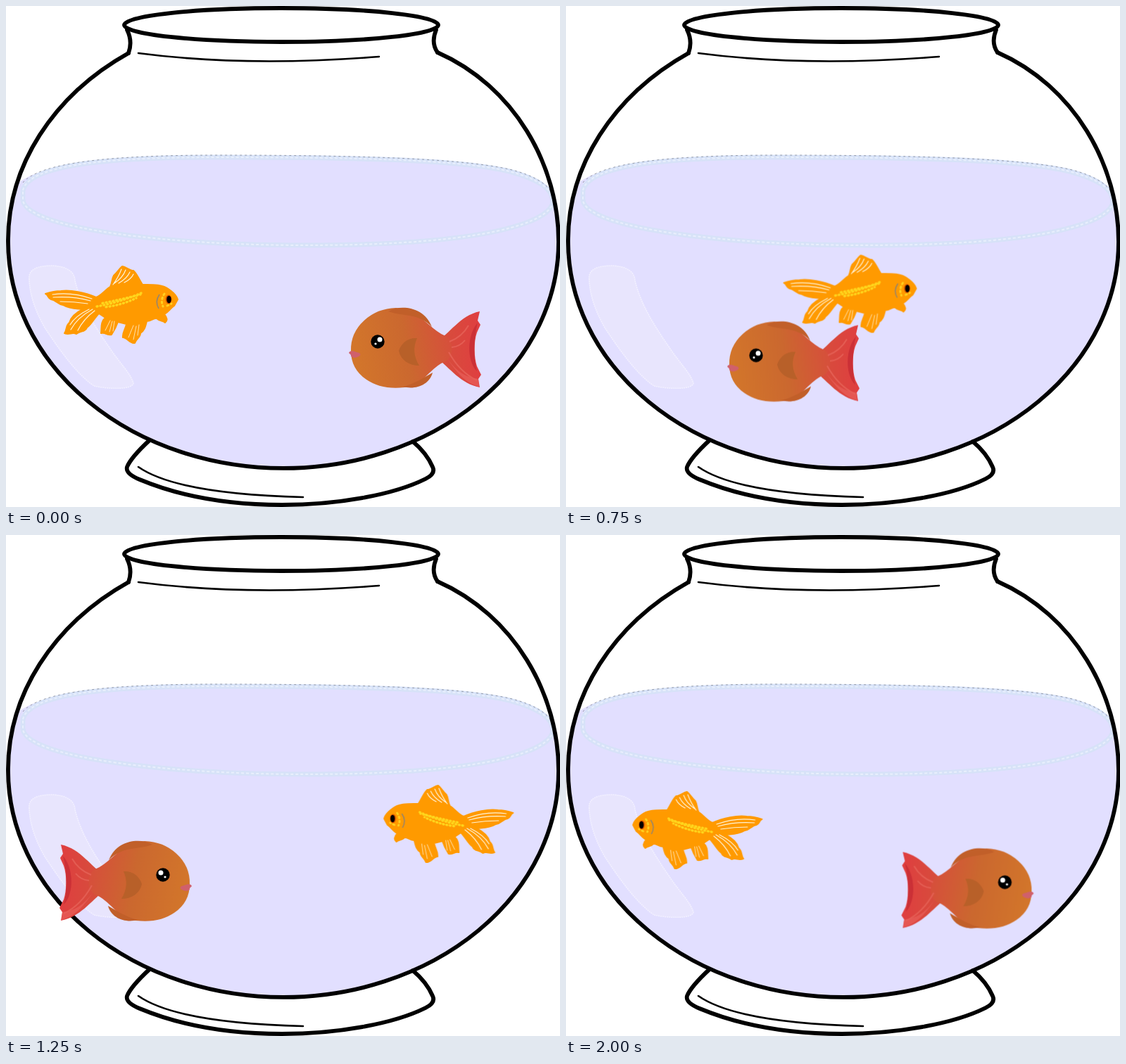
These frames come from a looping animation (787 by 712 pixels, 2250 ms). An HTML page:

```html
<!DOCTYPE html>
<html lang="en">
<head>
<meta charset="utf-8">
<title>Fish bowl</title>
<style>
  html, body { margin: 0; width: 100%; height: 100%; overflow: hidden; background: #fff; }
  svg { display: block; width: 787px; height: 712px; }
  .ink { fill: none; stroke: #000; stroke-width: 5.8; stroke-linecap: round; stroke-linejoin: round; }
  .thin { stroke-width: 2.6; }
  .rays { fill: none; stroke: #fff3da; stroke-width: 1.2; stroke-linecap: round; }
  .swim { animation: 2250ms step-end infinite; transform-origin: 0 0; }
  #gold { animation-name: gold; }
  #red { animation-name: red; }

  @keyframes gold {
    0% { transform: translate(0, 0); }
    11.111% { transform: translate(71px, -5px); }
    22.222% { transform: translate(141.5px, -10px); }
    33.333% { transform: translate(253.5px, -15.5px); }
    44.444% { transform: translate(394.5px, -20px); }
    55.555% { transform: translate(775px, -14px) scale(-.975, 1); }
    66.666% { transform: translate(679px, -9px) scale(-.975, 1); }
    77.777% { transform: translate(506px, -7px) scale(-.975, 1); }
    88.888%, 100% { transform: translate(333px, -5px) scale(-.975, 1); }
  }
  @keyframes red {
    0% { transform: translate(0, 0); }
    11.111% { transform: translate(-53px, 13px); }
    22.222% { transform: translate(-106.5px, 22.5px); }
    33.333% { transform: translate(-258px, 19.5px); }
    44.444% { transform: translate(-376px, -5px); }
    55.555% { transform: translate(751px, 6px) scale(-1, 1); }
    66.666% { transform: translate(864px, 15.5px) scale(-1, 1); }
    77.777% { transform: translate(1008px, 16px) scale(-1, 1); }
    88.888%, 100% { transform: translate(1151.5px, 16.5px) scale(-1, 1); }
  }
</style>
</head>
<body>
<svg viewBox="0 0 787 712">
  <defs>
    <path id="bowl" d="M174 67A391 322 0 0 0 3 335A391 322 0 0 0 785 335C785 226 722 114 613 66"/>
    <clipPath id="glass"><use href="#bowl"/></clipPath>
    <linearGradient id="skin" gradientUnits="userSpaceOnUse" x1="500" y1="505" x2="640" y2="480">
      <stop offset="0" stop-color="#d2752b"/>
      <stop offset=".5" stop-color="#cb682f"/>
      <stop offset="1" stop-color="#d84c3d"/>
    </linearGradient>
    <linearGradient id="tail" gradientUnits="userSpaceOnUse" x1="612" y1="0" x2="672" y2="0">
      <stop offset="0" stop-color="#d5503b"/>
      <stop offset="1" stop-color="#df3f40"/>
    </linearGradient>
    <path id="surface" d="M24 262C32 228 128 215 300 215C470 215 640 217 715 235C760 247 778 262 777 279C772 306 690 340 425 340C240 340 30 318 24 276Z"/>
  </defs>

  <!-- water -->
  <g clip-path="url(#glass)">
    <path fill="#e2dfff" d="M0 272C20 226 128 212 300 212C470 212 640 215 715 232C762 243 780 262 787 285V712H0Z"/>
    <use href="#surface" fill="none" stroke="#d7e2f8" stroke-width="7"/>
    <use href="#surface" fill="none" stroke="#e8effc" stroke-width="2" stroke-dasharray="4 3"/>
    <path fill="none" stroke="#777c88" stroke-width="1" stroke-dasharray="3 4" opacity=".7" d="M24 251C48 222 150 212 300 212C470 212 640 215 715 232C752 241 770 254 777 268"/>
  </g>
  <path fill="#e8e5fd" stroke="#f3f1ff" stroke-width="1.5" stroke-dasharray="2 1"
    d="M33 389C31 374 45 369 66 369C84 370 97 376 98 390C106 425 128 458 148 487C162 508 177 522 181 536C180 545 148 545 125 540C100 523 74 486 55 457C42 434 34 412 33 389Z"/>

  <!-- bowl -->
  <g class="ink">
    <ellipse cx="391" cy="27" rx="223" ry="24"/>
    <path d="M172 34C178 46 178 56 174 67M613 66C606 56 606 46 611 34"/>
    <use href="#bowl"/>
    <path d="M204 617C190 630 177 643 172 655C170 662 178 668 190 673C250 698 320 709 392 709C470 709 550 695 596 672C606 667 609 661 606 655C600 641 590 629 578 619"/>
    <path class="thin" d="M188 67Q340 87 530 72"/>
    <path class="thin" d="M188 655C225 681 305 695 422 698"/>
  </g>

  <g id="red" class="swim">
    <path fill="url(#tail)" d="M612 476C630 467 644 440 673 434L670 447L674 453L669 464C664 478 665 500 669 512L675 524L671 530L673 542C646 537 630 514 612 500Z"/>
    <path fill="#cb3036" d="M670 450C655 467 654 504 669 519C664 500 664 474 670 450Z"/>
    <path fill="url(#skin)" stroke="url(#skin)" stroke-width="2" d="M491 490C490 456 520 431 554 430C588 432 600 460 622 469C636 474 636 500 622 505C602 512 592 540 566 541C522 546 491 523 491 490Z"/>
    <path fill="#c15f29" d="M543 434C560 424 594 427 605 456C586 436 566 442 543 434ZM564 541C582 546 602 538 606 521C592 529 582 536 564 541Z"/>
    <path fill="none" stroke="#e7665b" stroke-width="2" opacity=".75" d="M630 477Q648 470 657 454M629 492C640 512 654 525 669 532M633 485Q645 484 652 475"/>
    <path fill="#e9605a" opacity=".7" d="M626 500C642 522 655 528 671 530L672 541C650 535 638 517 626 500Z"/>
    <path fill="#b86029" d="M558 490C562 478 572 471 584 472C578 485 579 498 587 511C573 511 561 504 558 490Z"/>
    <path fill="#d0606b" d="M487 493C489 488 496 491 498 492C504 493 505 496 501 498C497 501 489 500 490 496Z"/>
    <circle cx="528" cy="477" r="9.7"/>
    <circle cx="531" cy="474" r="3.5" fill="#fff"/>
    <circle cx="525" cy="480" r="1.6" fill="#fff"/>
  </g>

  <g id="gold" class="swim">
    <path fill="#ff9a00" stroke="#ff9a00" stroke-width="2" stroke-linejoin="round" d="M244 417C242 410 237 407 232 403C222 395 207 396 194 396C188 387 186 380 181 376C175 376 170 370 165 370C161 373 158 379 153 383C150 388 151 394 148 399C141 403 136 411 128 414C113 407 91 403 78 405C70 405 62 407 56 409C61 412 59 415 64 417C71 418 73 424 81 425C91 431 100 430 109 431C99 436 92 443 90 450C84 455 87 460 83 465C90 468 94 463 100 466C106 461 112 464 115 457C121 453 126 443 132 437L141 443C134 449 136 457 135 465C141 463 144 469 150 467C154 461 157 455 159 449L171 452C170 459 165 464 166 471C172 471 176 480 183 479C185 473 191 471 191 465C197 461 198 456 200 448C207 448 210 443 214 444C218 448 223 447 226 450C230 447 229 443 225 438C231 435 233 430 239 426Z"/>
    <g class="rays">
      <path d="M154 394Q166 386 170 375M160 394Q172 387 176 378M168 393Q178 388 181 381M152 396Q160 385 164 374"/>
      <path d="M122 416Q94 406 66 410M120 419Q95 412 67 414M116 423Q96 420 77 420"/>
      <path d="M123 431Q101 443 92 460M126 433Q110 445 102 461M118 431Q98 441 91 453"/>
      <path stroke-width=".8" d="M148 447L141 461M151 448L147 463M154 448L152 462M181 454L174 471M185 455L181 474M189 453L187 468"/>
    </g>
    <g fill="none" stroke="#ffd51c" stroke-width="3.4" stroke-linecap="round" stroke-dasharray="1 4">
      <path d="M129 427Q162 421 192 408"/>
      <path d="M134 423Q164 417 191 410" stroke-dashoffset="2"/>
      <path d="M140 428Q165 425 185 415" stroke-dashoffset="3"/>
    </g>
    <path fill="none" stroke="#ffd020" stroke-width="3" stroke-linecap="round" stroke-dasharray="2 4" d="M225 409Q219 418 223 427M229 426L235 423"/>
    <path fill="none" stroke="#8c8378" stroke-width="1.4" d="M218 410Q211 420 217 430"/>
    <ellipse cx="231" cy="417" rx="4.4" ry="6.4" fill="#d95400"/>
    <ellipse cx="231.5" cy="417" rx="3.2" ry="5.2"/>
  </g>
</svg>
</body>
</html>
```
